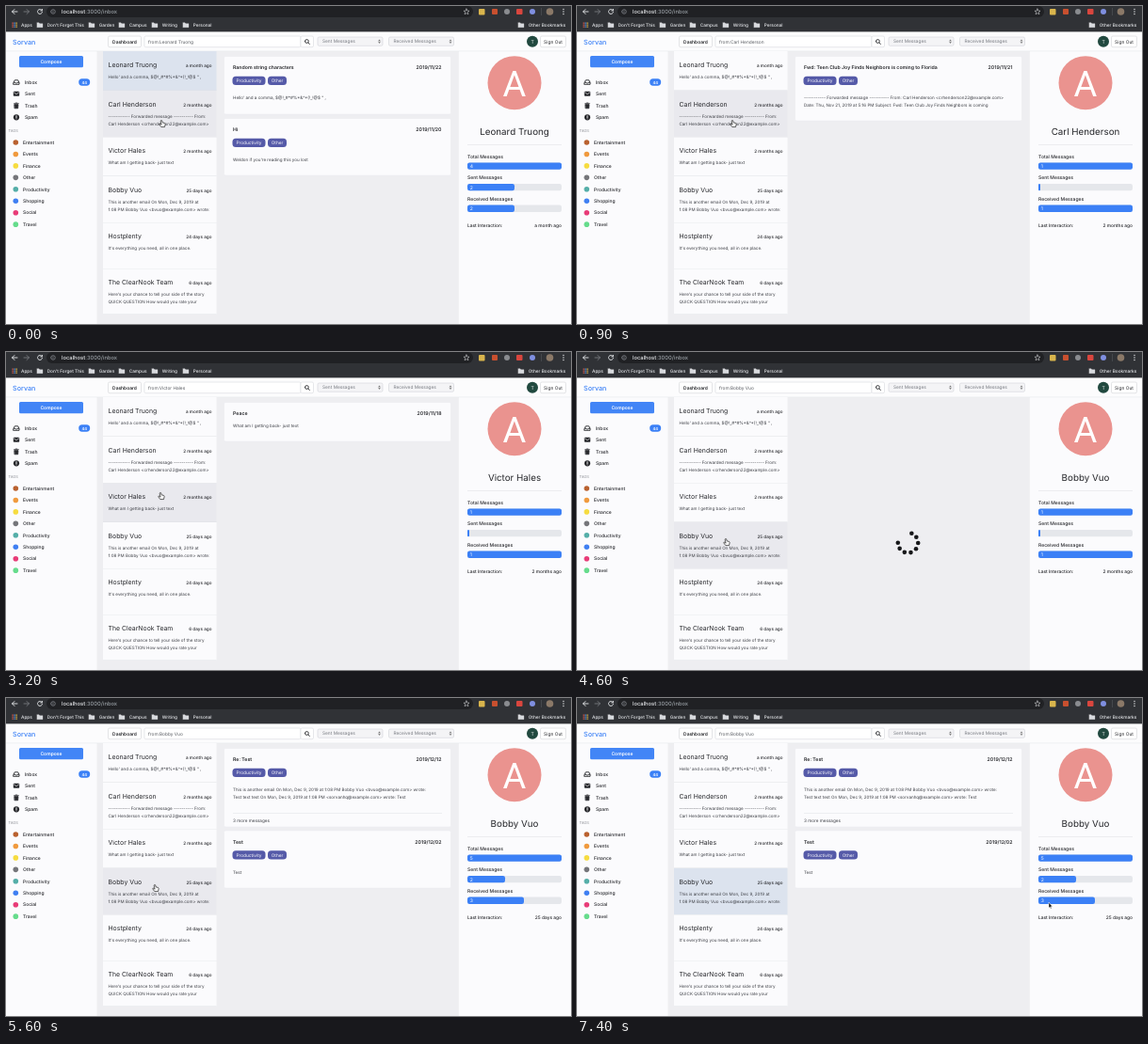
An HTML page for the animation above (7.5 s loop, 600 px wide and 338 px high).

```html
<!DOCTYPE html>
<html lang="en">
<head>
<meta charset="utf-8">
<title>Inbox</title>
<style>
html, body { margin: 0; width: 100%; height: 100%; overflow: hidden; background: #eeeef1; }
svg { display: block; width: 600px; height: 338px; font-family: Inter, "Open Sans", sans-serif; text-rendering: geometricPrecision; }
text { white-space: pre; }
</style>
</head>
<body>
<svg viewBox="0 0 600 338"><g id="page"></g><g id="live"></g></svg>
<script>
const LOOP = 7500, BLUE = '#3b80f6', INK = '#26272b';
const clamp = v => Math.max(0, Math.min(1, v));
const mix = (a, b, k) => a + (b - a) * k;
const smooth = k => k * k * (3 - 2 * k);
const esc = s => String(s).replace(/&/g, '&amp;').replace(/</g, '&lt;');

// y is the middle of the capitals
const text = (x, y, s, size = 4.65, fill = INK, weight = 400, anchor = 'start') =>
  `<text x="${x}" y="${y + size * .36}" font-size="${size}" fill="${fill}" font-weight="${weight}" text-anchor="${anchor}">${esc(s)}</text>`;
const rect = (x, y, w, h, fill, r = 0, stroke = 'none') =>
  `<rect x="${x}" y="${y}" width="${w}" height="${h}" rx="${r}" fill="${fill}" stroke="${stroke}" stroke-width=".5"/>`;
const dot = (x, y, r, fill) => `<circle cx="${x}" cy="${y}" r="${r}" fill="${fill}"/>`;
const path = (x, y, d, stroke, width = 1, fill = 'none') =>
  `<path transform="translate(${x} ${y})" d="${d}" fill="${fill}" stroke="${stroke}" stroke-width="${width}" stroke-linejoin="round" stroke-linecap="round"/>`;

const FWD = '----------- Forwarded message ---------- From:';
const EMAIL = 'Carl Henderson <crhenderson22@example.com>';
const SYMBOLS = `Hello' and a comma, $@!_#*#%*&^*(!_!@$ " ,`;
const REPLY = 'This is another email On Mon, Dec 9, 2019 at';
const SENDER = '1:08 PM Bobby Vuo <bvuo@example.com> wrote:';

const rowEdges = [48, 90, 139.5, 181, 230.5, 279.5, 328];
const rows = [
  [63, 'Leonard Truong', 'a month ago', SYMBOLS],
  [105, 'Carl Henderson', '2 months ago', FWD, EMAIL],
  [154, 'Victor Hales', '2 months ago', 'What am I getting back- just text'],
  [196, 'Bobby Vuo', '25 days ago', REPLY, SENDER],
  [245, 'Hostplenty', '24 days ago', "It's everything you need, all in one place."],
  [294, 'The ClearNook Team', '6 days ago', "Here's your chance to tell your side of the story", 'QUICK QUESTION How would you rate your']
];

// click: row opens, data: statistics arrive, ready: cards replace the spinner
const views = [
  { row: 0, click: -9e3, data: -9e3, ready: -9e3, total: 4, sent: 2, got: 2, cards: [
    { y: 53.5, h: 61.5, title: 'Random string characters', date: '2019/11/22', tags: 1, lines: [SYMBOLS] },
    { y: 119.5, h: 60.5, title: 'Hi', date: '2019/11/20', tags: 1, lines: ["Weldon if you're reading this you lost"] }] },
  { row: 1, click: 100, data: 250, ready: 700, total: 1, sent: 0, got: 1, cards: [
    { y: 53.5, h: 68.5, title: 'Fwd: Teen Club Joy Finds Neighbors is coming to Florida', date: '2019/11/21', tags: 1,
      lines: [FWD + ' ' + EMAIL, 'Date: Thu, Nov 21, 2019 at 5:16 PM Subject: Fwd: Teen Club Joy Finds Neighbors is coming'] }] },
  { row: 2, click: 1800, data: 2300, ready: 2900, total: 1, sent: 0, got: 1, cards: [
    { y: 53.5, h: 41.5, title: 'Peace', date: '2019/11/18', lines: ['What am I getting back- just text'] }] },
  { row: 3, click: 4500, data: 4900, ready: 5100, total: 5, sent: 2, got: 3, cards: [
    { y: 53.5, h: 83.5, title: 'Re: Test', date: '2019/12/12', tags: 1, more: '3 more messages',
      lines: [REPLY + ' ' + SENDER, 'Test text test On Mon, Dec 9, 2019 at 1:08 PM <sorvanhq@example.com> wrote: Test'] },
    { y: 141, h: 61, title: 'Test', date: '2019/12/02', tags: 1, lines: ['Test'] }] }
];

// time, x, y of the pointer
const track = [[0, 166, 125], [1500, 166, 125], [1750, 165, 153], [3900, 165, 153], [4300, 159, 202],
  [5750, 159, 202], [6050, 235, 235], [6400, 360, 254], [6800, 487, 226], [7200, 501, 219], [7500, 501, 219]];

function browser() {
  let s = rect(0, 0, 600, 27.4, '#303236') + rect(43, 0, 453, 12, '#202124', 6);
  s += path(9, 6, 'M3 0H-2.5M0 -2.5L-2.5 0L0 2.5', '#e8eaed', .9);
  s += path(22, 6, 'M-3 0H2.5M0 -2.5L2.5 0L0 2.5', '#777a7e', .9);
  s += path(36, 6, 'M2 -1.6A2.5 2.5 0 1 0 2.5 .5M2.4 -2.6V-1H.8', '#e8eaed', .9);
  s += path(50, 6, 'M-2.3 0A2.3 2.3 0 1 0 2.3 0A2.3 2.3 0 1 0 -2.3 0M0 0V1M0 -1.1V-1', '#9aa0a6', .6);
  s += `<text x="59" y="8.1" font-size="5.8" font-weight="500" fill="#e8eaed">localhost<tspan fill="#9aa0a6">:3000/inbox</tspan></text>`;
  s += path(489, 6, 'M0 -3L.9 -.9L3 -.8L1.4 .6L1.9 2.8L0 1.6L-1.9 2.8L-1.4 .6L-3 -.8L-.9 -.9Z', '#e8eaed', .5);
  s += rect(502, 3, 6.5, 6.5, '#d9b54c', 1) + rect(516, 3, 6, 6, '#c8502f', 1) + dot(532, 6, 3, '#8a8c90');
  s += rect(542, 3, 6.5, 6, '#d9463e', 1) + dot(559, 6, 3, '#7f8fe0') + rect(568, 2, .5, 8, '#5b5e63') + dot(577.5, 6, 3.8, '#8b7968');
  s += [3.5, 6, 8.5].map(y => dot(592, y, .7, '#e8eaed')).join('');
  for (let i = 0; i < 9; i++) s += rect(6.5 + i % 3 * 2, 17.5 + (i / 3 | 0) * 2, 1.3, 1.3, ['#df5b4f', '#5b9bea', '#e7bd4b'][i % 3]);
  s += text(16, 20.3, 'Apps', 4.8, '#e8eaed', 500);
  for (const [x, name] of [[33, "Don't Forget This"], [88, 'Garden'], [120, 'Campus'], [155, 'Writing'], [188, 'Personal'], [544, 'Other Bookmarks']])
    s += path(x, 17.7, 'M0 0H2L3 1H6V5H0Z', '#d8dade', .3, '#d8dade') + text(x + 10.7, 20.3, name, 4.75, '#e8eaed', 500);
  return s;
}

function chrome() {
  let s = rect(0, 27, 600, 21, '#fcfcfd') + rect(0, 48, 96.5, 290, '#fbfbfd') + rect(480, 48, 120, 290, '#fbfbfd');
  s += rect(0, 47.7, 600, .5, '#e2e3e7') + rect(480, 48, .5, 290, '#e4e4e8') + browser();
  s += text(7, 38, 'Sorvan', 7.2, BLUE, 500);
  s += rect(108.5, 32, 35, 11.7, '#fff', 1.5, '#c8cacf') + text(126, 38, 'Dashboard', 4.9, INK, 600, 'middle');
  s += rect(147, 32, 166, 11.7, '#fff', 1.5, '#cfd1d6') + rect(313, 32, 13.5, 11.7, '#fff', 1.5, '#cfd1d6');
  s += path(319.4, 37.5, 'M-1.9 0A1.9 1.9 0 1 0 1.9 0A1.9 1.9 0 1 0 -1.9 0M1.4 1.4L3 3', INK, .9);
  for (const [x, name] of [[331, 'Sent Messages'], [406.5, 'Received Messages']])
    s += rect(x, 33, 69, 9.3, '#f4f4f6', 1.5, '#c9cbd0') + text(x + 5, 37.7, name, 4.8, '#777a80') +
      path(x + 65.5, 37.7, 'M-1 -.6L0 -2L1 -.6ZM-1 .6L0 2L1 .6Z', '#666', .2, '#666');
  s += dot(559, 37.8, 6, '#21493f') + text(559, 37.8, 'T', 5, '#fff', 400, 'middle');
  s += rect(567.5, 32, 27, 11.7, '#fff', 1.5, '#c8cacf') + text(581, 38, 'Sign Out', 4.9, INK, 400, 'middle');
  return s + sidebar() + rect(490, 147.5, 100, .5, '#dcdde2') + dot(540, 81.7, 28.5, '#ea938f') +
    text(540, 82, 'A', 38, '#fff', 400, 'middle').replace('<text', '<text font-family="Roboto, sans-serif"');
}

function sidebar() {
  let s = rect(14, 53, 68, 12.3, '#4285f6', 1.5) + text(48, 59, 'Compose', 5, '#fff', 600, 'middle');
  s += path(11, 81, 'M-3 .3L-1.7 -2.2H1.7L3 .3V2.3H-3ZM-2.5 .3H-1L-.5 1.1H.5L1 .3H2.5', INK, .9);
  s += rect(7.8, 90.8, 6.4, 5, INK, .8) + path(11, 93, 'M-2.8 -1.3L0 .7L2.8 -1.3', '#fff', .6);
  s += path(11, 106, 'M-2.4 -2.4H2.4M-.8 -3H.8M-2 -1.4H2L1.7 2.8H-1.7Z', INK, .7, INK);
  s += dot(11, 118.3, 3.1, INK) + path(11, 118.3, 'M0 -1.6V.3M0 1.5V1.6', '#fff', .9);
  ['Inbox', 'Sent', 'Trash', 'Spam'].forEach((n, i) => s += text(20, 81 + i * 12.4, n, 5, INK, 500));
  s += rect(77.2, 77.3, 12, 7.4, BLUE, 3.7) + text(83.2, 81, '44', 4.2, '#fff', 600, 'middle');
  s += text(2.5, 133, 'TAGS', 4, '#8b8d93');
  [['Entertainment', '#b9612f'], ['Events', '#f09a3e'], ['Finance', '#f6dc40'], ['Other', '#75767a'],
    ['Productivity', '#54aea8'], ['Shopping', '#3f7ff2'], ['Social', '#e83c78'], ['Travel', '#66dc8c']]
    .forEach(([n, c], i) => s += dot(10.3, 145 + i * 12.45, 2.8, c) + text(18, 145 + i * 12.45, n, 4.95, INK, 500));
  return s;
}

function list(selected, hovered) {
  return rows.map(([y, name, ago, ...lines], i) => {
    const top = rowEdges[i], h = rowEdges[i + 1] - top;
    const fill = i === hovered ? '#e9e9ee' : i === selected ? '#dce3ee' : '#fbfbfd';
    return rect(103, top, 120.5, h, fill) + rect(103, top + h - .5, 120.5, .5, '#dfe0e4') +
      text(108.5, y, name, 6.9) + text(218.5, y, ago, 4.65, INK, 500, 'end') +
      lines.map((l, k) => text(108.5, y + 12.7 + k * 7.8, l, 4.55, '#3c3e44')).join('');
  }).join('');
}

function card({ y, h, title, date, tags, more, lines }) {
  let s = rect(231.5, y, 241, h, '#fbfbfd', 1.5, '#e8e8ec');
  s += text(241, y + 11.7, title, 5.2, INK, 600) + text(462.5, y + 11.7, date, 5.2, INK, 600, 'end');
  if (tags) for (const [x, w, n] of [[240.5, 35, 'Productivity'], [278, 20, 'Other']])
    s += rect(x, y + 21.3, w, 9.3, '#555aa8', 3.5) + text(x + w / 2, y + 26, n, 4.8, '#fff', 400, 'middle');
  lines.forEach((l, i) => s += text(241, y + (tags ? 44.3 : 24.5) + i * 7.6, l, 4.55, '#3c3e44'));
  if (more) s += rect(241, y + 68.5, 222, .5, '#dfe0e4') + text(241, y + 76.8, more, 4.65, '#3c3e44');
  return s;
}

// solves cubic-bezier(.5, 0, .5, 1)
function swing(x) {
  let lo = 0, hi = 1;
  for (let i = 0; i < 14; i++) {
    const u = (lo + hi) / 2;
    if (1.5 * u * (1 - u) + u ** 3 < x) lo = u; else hi = u;
  }
  return smooth(lo);
}

function spinner(t) {
  let s = '';
  for (let i = 0; i < 8; i++) {
    const phase = ((t - 2200) / 1200 + 100.5 + (i - 3.5) * .03) % 1;
    const a = (235 + (i - 3.5) * 15 + 360 * swing(phase)) * Math.PI / 180;
    s += dot(351.5 + 10.7 * Math.cos(a), 202.8 + 10.7 * Math.sin(a), 2.3, '#17181a');
  }
  return s;
}

function contact(t, view, before) {
  const now = t >= view.data ? view : before;
  const k = smooth(clamp((t - view.data) / 550));
  const share = (v, key) => Math.max(2, v[key] / v.total * 100);
  let s = text(540, 133, rows[view.row][1], 9.8, INK, 400, 'middle');
  [['Total', 'total'], ['Sent', 'sent'], ['Received', 'got']].forEach(([label, key], i) => {
    const y = 160 + i * 22.6, w = mix(share(before, key), share(view, key), k);
    s += text(490, y, label + ' Messages', 5.05, INK, 500) + rect(490, y + 6.4, 100, 7.3, '#e5e7eb', 2.2) +
      rect(490, y + 6.4, w, 7.3, BLUE, Math.min(2.2, w / 2));
    if (w > 6) s += text(492.7, y + 10.1, now[key], 5, '#fff');
  });
  return s + text(490, 233, 'Last Interaction:', 4.85, INK, 500) + text(590, 233, rows[now.row][2], 4.85, INK, 500, 'end');
}

function pointer(t) {
  const i = track.findIndex((p, n) => n && t <= p[0]);
  const [t0, x0, y0] = track[i - 1], [t1, x1, y1] = track[i];
  const k = (t - t0) / (t1 - t0), e = t < 5000 || t > 6800 ? smooth(k) : k;
  return [mix(x0, x1, e), mix(y0, y1, e)];
}

const hand = 'M-1.7 -3.2Q-.9 -4.2 -.3 -3.2L.1 -1.1L2.4 -.6Q3.3 -.3 3.1 .8L2.5 3.6H-1.2L-3.2 .9Q-3.4 -.1 -2.3 .2L-1.2 1Z';
const arrowhead = 'M0 -1.5V4.2L1.2 3.1L2.1 5L3 4.6L2.2 2.7H3.8Z';

function draw(t) {
  const at = views.findLastIndex(v => t >= v.click), view = views[at], before = views[Math.max(0, at - 1)];
  const [x, y] = pointer(t), inList = x > 103 && x < 223.5;
  const hovered = inList ? rowEdges.findLastIndex(e => y >= e) : -1;
  live.innerHTML = text(151, 38, 'from:' + rows[view.row][1], 4.8, '#55585e') + list(view.row, hovered) +
    (t >= view.ready ? view.cards.map(card).join('') : spinner(t)) +
    contact(t, view, before) +
    (inList ? path(x, y, hand, '#222', .7, '#fff') : path(x, y, arrowhead, '#fff', .5, '#111'));
}

const live = document.getElementById('live');
document.getElementById('page').innerHTML = chrome();
const start = performance.now();
function frame() {
  draw((performance.now() - start) % LOOP);
  requestAnimationFrame(frame);
}
frame();
</script>
</body>
</html>
```
